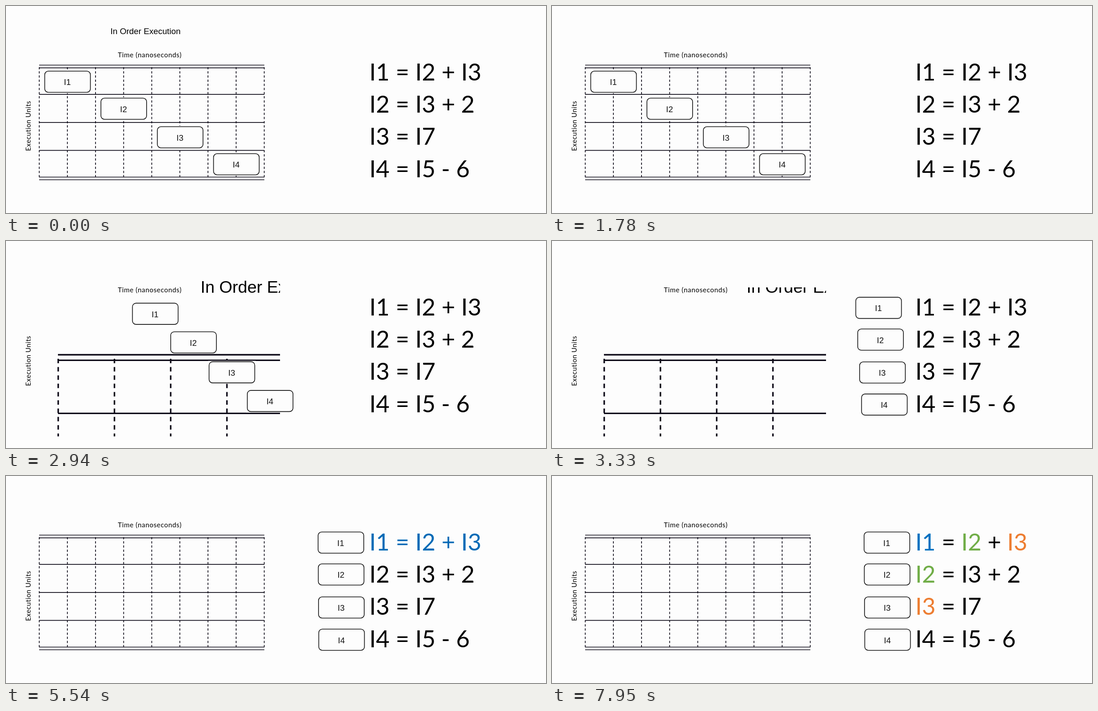
An HTML page with a canvas for the animation above (7990 ms loop, 1206x464 px).

```html
<!DOCTYPE html>
<html lang="en">
<head>
<meta charset="utf-8">
<title>In Order Execution</title>
<style>
  html, body { margin: 0; width: 100%; height: 100%; overflow: hidden; background: #fdfdfd; }
  canvas { display: block; }
</style>
</head>
<body>
<canvas id="stage" width="1206" height="464"></canvas>
<script>
const ctx = document.getElementById('stage').getContext('2d');
const LOOP = 7990, PAPER = '#fdfdfd', LINE = '#0e0b18';
const SANS = '"Liberation Sans", Arial, sans-serif';
const HUMAN = 'Lato, Carlito, sans-serif';
const BLACK = [0, 0, 0], BLUE = [0, 112, 192], GREEN = [112, 173, 71], ORANGE = [237, 125, 49];
const MORPH = 1048, FLY = 2489, TINT = 4740, SPLIT = 6047;

// Instruction boxes: label, place on the grid, place beside the equations
const boxes = [
  ['I1', 86.5, 146, 697, 125.5],
  ['I2', 212, 206.5, 697.5, 197],
  ['I3', 338, 270.5, 698, 271],
  ['I4', 463.5, 331, 698.5, 343.2],
];

// Equations: baseline, then [text, centre, tinted colour, final colour]
const equations = [
  [167, ['I1', 834, BLUE, BLUE], ['=', 885.5, BLUE, BLACK], ['I2', 936.5, BLUE, GREEN],
        ['+', 988, BLUE, BLACK], ['I3', 1039, BLUE, ORANGE]],
  [239, ['I2', 834, BLACK, GREEN], ['=', 885.5], ['I3', 936.5], ['+', 988], ['2', 1031.5]],
  [311, ['I3', 834, BLACK, ORANGE], ['=', 885.5], ['I7', 936.5]],
  [383.5, ['I4', 834], ['=', 885.5], ['I5', 936.5], ['-', 982], ['6', 1020.5]],
];

const clamp = v => Math.min(1, Math.max(0, v));
const lerp = (a, b, p) => a + (b - a) * p;
const mix = (a, b, p) => a.map((v, i) => lerp(v, b[i], p));
const ease = u => u < .5 ? 4 * u ** 3 : 1 - 4 * (1 - u) ** 3;
const morph = (t, start) => ease(clamp((t - start) / MORPH));

function text(str, x, y, size, font, { align = 'left', color = '#000', gap = 0 } = {}) {
  ctx.font = `${size}px ${font}`;
  ctx.textAlign = align;
  ctx.letterSpacing = gap + 'px';
  ctx.fillStyle = color;
  ctx.fillText(str, x, y);
}

function line(x1, y1, x2, y2) {
  ctx.beginPath();
  ctx.moveTo(x1, y1);
  ctx.lineTo(x2, y2);
  ctx.stroke();
}

function chart(titleAlpha) {
  ctx.strokeStyle = LINE;
  ctx.lineWidth = 1.7;
  for (const y of [132.5, 138.7, 198.2, 261.2, 323.7, 383.5, 389.5]) line(74, y, 577, y);
  ctx.setLineDash([5, 4.3]);
  for (let i = 0; i < 9; i++) line(74.3 + i * 62.8, 137, 74.3 + i * 62.8, 387);
  ctx.setLineDash([]);
  ctx.globalAlpha = titleAlpha;
  text('In Order Execution', 233.3, 63.2, 18.8, SANS);
  ctx.globalAlpha = 1;
}

// Enlarged chart whose crop slides down while the boxes fly
function zoomedChart(p) {
  const top = lerp(9, 107, p);
  ctx.save();
  ctx.beginPath();
  ctx.rect(32, top, 580, 438 - top);
  ctx.clip();
  ctx.translate(-32, -10);
  ctx.scale(2, 2);
  chart(1);
  ctx.restore();
}

function box(label, x, y) {
  ctx.fillStyle = PAPER;
  ctx.fillRect(x - 2, y - 2, 106, 51.5);
  ctx.beginPath();
  ctx.roundRect(x, y, 102, 47.5, 8);
  ctx.strokeStyle = '#111';
  ctx.lineWidth = 1.6;
  ctx.stroke();
  text(label, x + 50.5, y + 31.3, 18.5, SANS, { align: 'center', color: '#111' });
}

function draw(t) {
  const fly = morph(t, FLY), tint = morph(t, TINT), split = morph(t, SPLIT);
  ctx.fillStyle = PAPER;
  ctx.fillRect(0, 0, 1206, 464);

  if (t >= FLY && t < FLY + MORPH) zoomedChart(fly);
  else chart(1 - clamp((t - 1150) / 500));

  text('Time (nanoseconds)', 249.7, 114.5, 15.2, HUMAN, { gap: .58 });
  ctx.save();
  ctx.translate(54.5, 325);
  ctx.rotate(-Math.PI / 2);
  text('Execution Units', 0, 0, 15.2, HUMAN, { gap: .48 });
  ctx.restore();

  for (const [label, x1, y1, x2, y2] of boxes) box(label, lerp(x1, x2, fly), lerp(y1, y2, fly));

  for (const [y, ...tokens] of equations)
    for (const [str, x, tinted = BLACK, final = BLACK] of tokens) {
      const color = mix(mix(BLACK, tinted, tint), final, split);
      text(str, x, y, 52.4, HUMAN, { align: 'center', color: `rgb(${color.map(Math.round)})` });
    }
}

ctx.fontKerning = 'none';
const start = performance.now();
function tick() {
  draw((performance.now() - start) % LOOP);
  requestAnimationFrame(tick);
}
tick();
</script>
</body>
</html>
```
